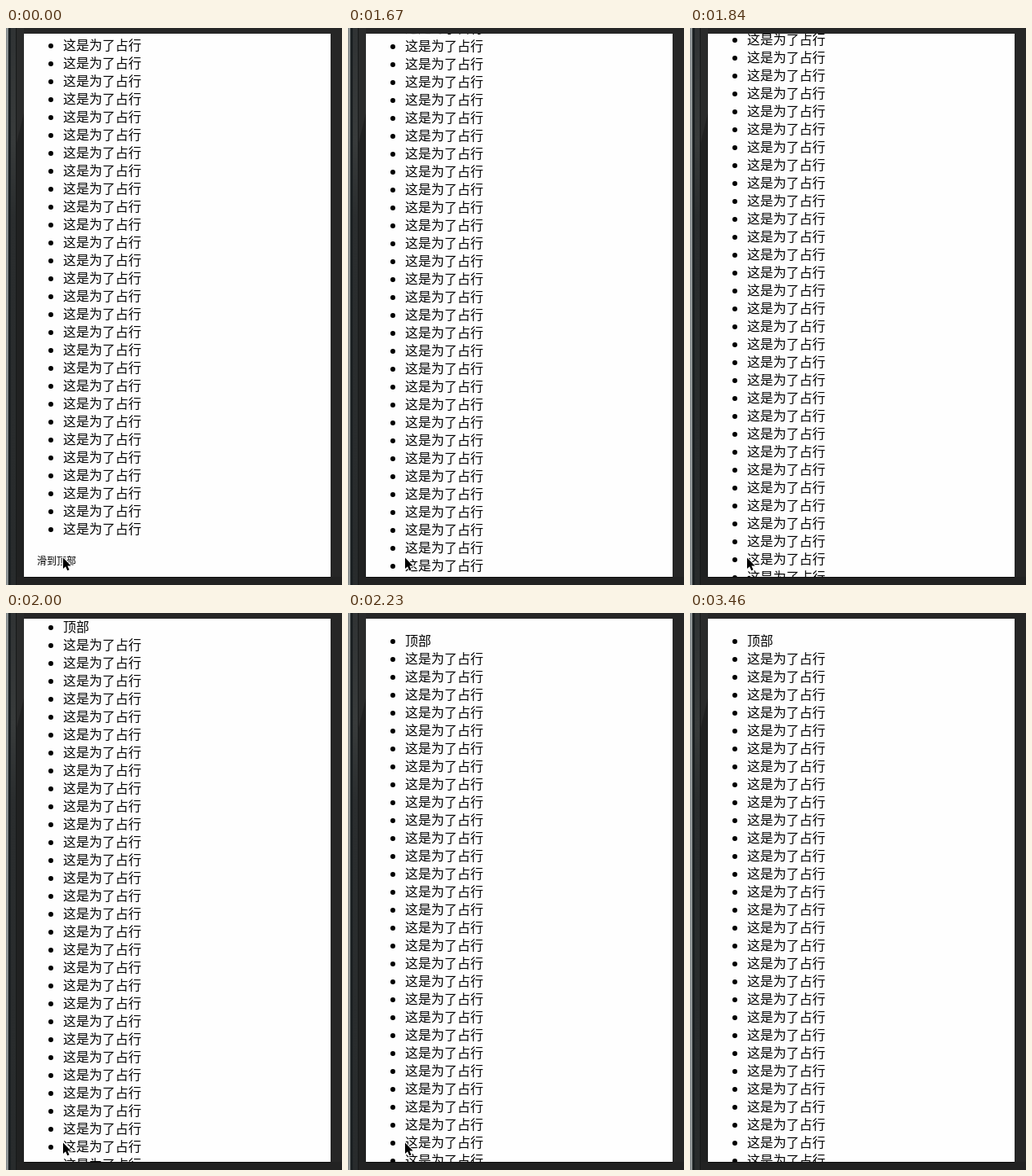
An HTML page that plays this animation: 412 px wide and 684 px high, repeating every 3.88 s.

```html
<!DOCTYPE html>
<html lang="zh-CN">
<head>
<meta charset="utf-8">
<title>滑到顶部</title>
<style>
  html, body { margin: 0; width: 100%; height: 100%; overflow: hidden; background: #262626; }
  svg { display: block; width: 412px; height: 684px; }
  text { font-family: "Noto Sans CJK SC", "Noto Sans CJK", sans-serif; font-size: 16px; fill: #000; }
  .small { font-size: 12px; }
</style>
</head>
<body>
<svg viewBox="0 0 412 684">
  <defs>
    <clipPath id="screen"><rect x="22" y="7" width="376" height="667"/></clipPath>
    <linearGradient id="rim" x1="0" y1="0" x2="0" y2="1">
      <stop offset="0" stop-color="#303334"/>
      <stop offset=".2" stop-color="#383b3b"/>
      <stop offset=".34" stop-color="#2a2d2e"/>
      <stop offset="1" stop-color="#282b2c"/>
    </linearGradient>
    <linearGradient id="edge">
      <stop offset="0" stop-color="#6f7577"/>
      <stop offset=".6" stop-color="#a4aaab"/>
      <stop offset="1" stop-color="#5c6263"/>
    </linearGradient>
  </defs>
  <rect width="412" height="684" fill="#262626"/>
  <rect width="3" height="684" fill="url(#edge)"/>
  <rect x="3" width="3" height="684" fill="#1b2022"/>
  <rect x="6" width="7" height="684" fill="url(#rim)"/>
  <rect x="12" width="1" height="684" fill="#171919"/>
  <path d="M13 0H22V105L13 142Z" fill="#2a2b2b"/>
  <path d="M13 142L22 105V684H13Z" fill="#202121"/>
  <rect x="13" y="674" width="399" height="10" fill="#222"/>
  <rect x="22" y="674" width="376" height="1" fill="#0c0c0c"/>
  <rect x="22" y="7" width="376" height="667" fill="#fefefe"/>
  <g clip-path="url(#screen)"><g id="page"></g></g>
  <path id="cursor" d="M0 0V13.6L3.1 10.8L5.3 15.8L7.6 14.8L5.4 10H9.7Z"
        fill="#000" stroke="#fff" stroke-width="2" paint-order="stroke"/>
</svg>
<script>
const LOOP = 3880, ROWS = 94, ROW_HEIGHT = 22, BOTTOM = 1465;
const page = document.getElementById('page');
const cursor = document.getElementById('cursor');

function add(tag, attrs, content = '') {
  const el = document.createElementNS('http://www.w3.org/2000/svg', tag);
  for (const key in attrs) el.setAttribute(key, attrs[key]);
  el.textContent = content;
  page.append(el);
}

for (let i = 0; i < ROWS; i++) {
  const y = 40 + i * ROW_HEIGHT;
  add('circle', { cx: 55, cy: y - 5, r: 3 });
  add('text', { x: 70, y }, i ? '这是为了占行' : '顶部');
}
add('text', { x: 38, y: 659 + BOTTOM, class: 'small' }, '滑到顶部');

// The page drops an eighth of its offset per tick, in whole pixels.
const repaintTimes = [1500, 1560, 1620, 1670, 1730, 1790, 1840, 1890, 1950, 2000, 2060, 2120, 2170, 2230];
const repaintTicks = [0, 4, 8, 12, 15, 18, 22, 25, 28, 31, 34, 37, 40, 43];

function scrollAt(t) {
  if (t < repaintTimes[0]) return BOTTOM;
  const index = repaintTimes.filter(time => time <= t).length - 1;
  let offset = 1276;
  for (let i = 0; i < repaintTicks[index]; i++) offset = Math.floor(offset * 7 / 8);
  return offset;
}

function cursorAt(t) {
  const step = t < 2710 ? 0 : Math.floor((t - 2710) / 56.6) + 1;
  const k = Math.min(step / 10, 1);
  const eased = k * k * (3 - 2 * k);
  return [70 + 330 * eased + 3 * Math.max(step - 10, 0), 650.5 + 31 * eased];
}

function draw(t) {
  page.setAttribute('transform', `translate(0 ${-scrollAt(t)})`);
  cursor.setAttribute('transform', `translate(${cursorAt(t)})`);
  cursor.setAttribute('visibility', t < 3460 ? 'visible' : 'hidden');
}

const start = performance.now();
function tick(now) {
  draw(Math.max(now - start, 0) % LOOP);
  requestAnimationFrame(tick);
}
draw(0);
requestAnimationFrame(tick);
</script>
</body>
</html>
```
